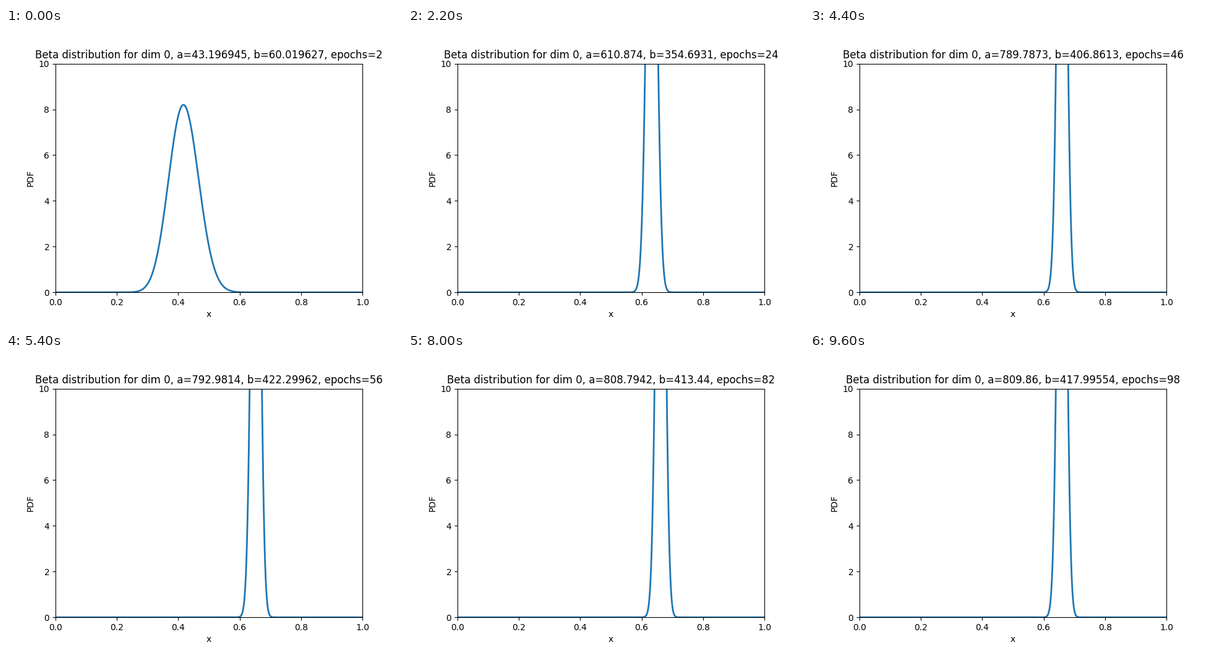
Recreate the animation shown at these times as a matplotlib script. Size 640 by 480 pixels, loop 9.8 s.

```python
import math

import numpy as np
import matplotlib.pyplot as plt
from matplotlib.animation import FuncAnimation

FRAMES, INTERVAL = 49, 200
KEYS = np.array([0, 7, 15, 22, 27, 40, 48])
ALPHA = np.array([43.196945, 417.71466, 737.6221, 789.7873, 792.9814, 808.7942, 809.86])
BETA = np.array([60.019627, 346.24136, 361.71027, 406.8613, 422.29962, 413.44, 417.99554])


def monotone_curve(keys, values):
    """Cubic Hermite samples at every frame, without overshoot."""
    h = np.diff(keys)
    d = np.diff(values) / h
    slope = np.zeros(len(keys))
    slope[0], slope[-1] = d[0], d[-1]
    for k in range(1, len(keys) - 1):
        if d[k - 1] * d[k] > 0:
            slope[k] = 2 * d[k - 1] * d[k] / (d[k - 1] + d[k])
    i = np.arange(FRAMES)
    k = np.clip(np.searchsorted(keys, i, side="right") - 1, 0, len(h) - 1)
    t = (i - keys[k]) / h[k]
    return (values[k] * (1 + 2 * t) * (1 - t) ** 2
            + values[k + 1] * t * t * (3 - 2 * t)
            + h[k] * slope[k] * t * (1 - t) ** 2
            + h[k] * slope[k + 1] * t * t * (t - 1))


def beta_pdf(x, a, b):
    log_norm = math.lgamma(a + b) - math.lgamma(a) - math.lgamma(b)
    x = np.clip(x, 1e-12, 1 - 1e-12)
    return np.exp(log_norm + (a - 1) * np.log(x) + (b - 1) * np.log1p(-x))


alphas = monotone_curve(KEYS, ALPHA).astype(np.float32)
betas = monotone_curve(KEYS, BETA).astype(np.float32)
xs = np.linspace(0, 1, 1000)

fig, ax = plt.subplots(figsize=(6.4, 4.8), dpi=100)
line, = ax.plot([], [], lw=2)
ax.set(xlim=(0, 1), ylim=(0, 10), xlabel="x", ylabel="PDF")
title = ax.set_title("")


def update(i):
    a, b = alphas[i], betas[i]
    line.set_data(xs, beta_pdf(xs, float(a), float(b)))
    title.set_text(f"Beta distribution for dim 0, a={str(a)}, b={str(b)}, epochs={2 * i + 2}")
    return line, title


anim = FuncAnimation(fig, update, frames=FRAMES, init_func=lambda: update(0),
                     interval=INTERVAL, repeat=True, repeat_delay=0)
plt.show()
```
